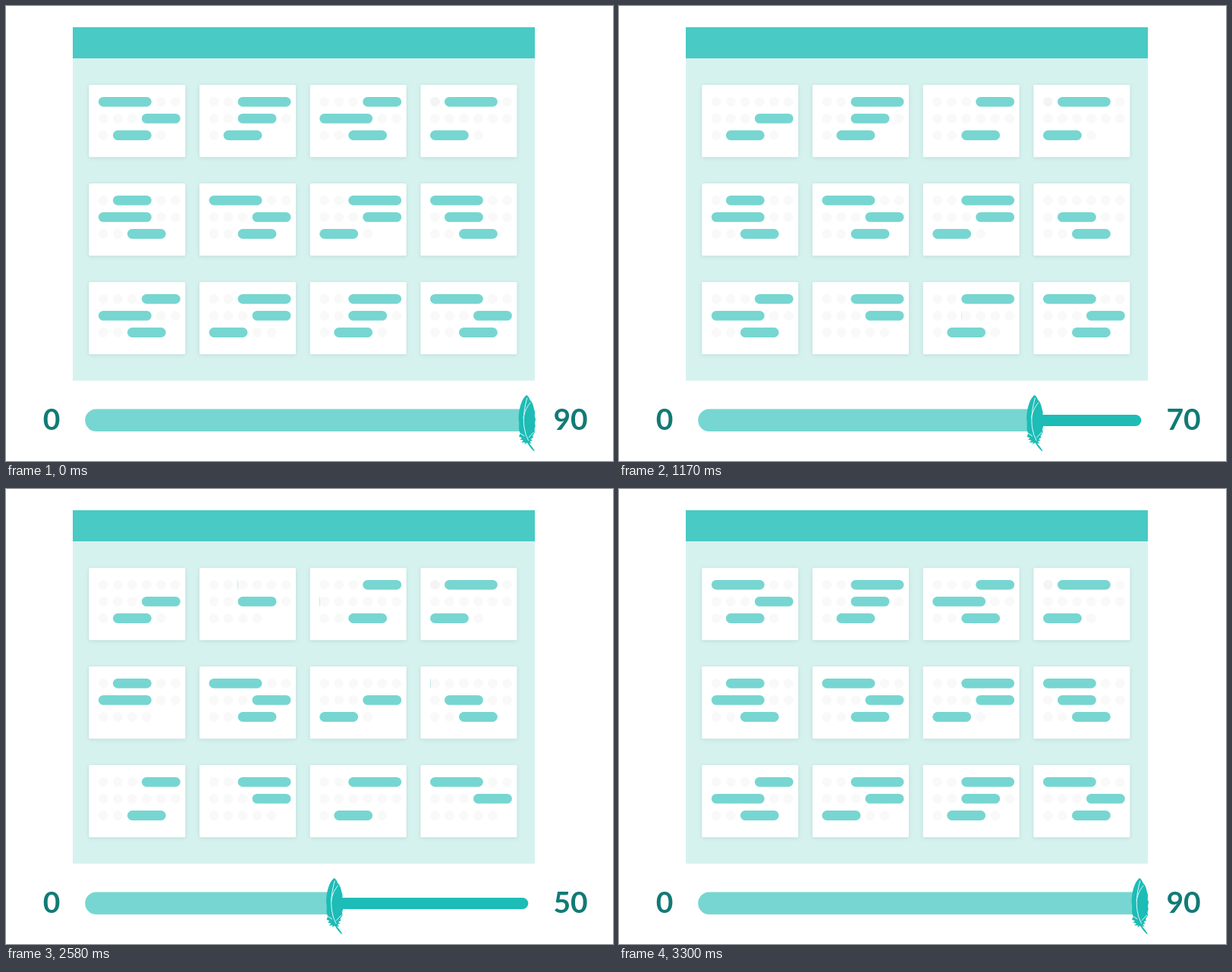
Recreate the animation shown at these times as an HTML page. Size 800 by 600 pixels, loop 3600 ms.

```html
<!DOCTYPE html>
<html lang="en">
<head>
<meta charset="utf-8">
<title>Slider filter</title>
<style>
  html, body { margin: 0; width: 100%; height: 100%; overflow: hidden; background: #fff; }
  svg { display: block; width: 800px; height: 600px; }
  text { font: 700 39px Lato, "Open Sans", sans-serif; fill: #127a75; text-anchor: middle; }
  .card { fill: #fff; filter: drop-shadow(0 1px 2.5px rgba(0, 80, 75, .14)); }
  .dot { fill: #f9f9f9; }
  .bar { fill: #77d6d1; }
  .slit { fill: none; stroke: #e4f7f6; stroke-width: 1; stroke-linecap: round; }
</style>
</head>
<body>
<svg viewBox="0 0 800 600">
  <rect x="88" y="28" width="609" height="466" fill="#d6f2ef"/>
  <rect x="88" y="28" width="609" height="41" fill="#49cac5"/>
  <g id="cards"></g>
  <rect x="300" y="539" width="388.3" height="15" rx="7.5" fill="#1dbcb6"/>
  <path id="fill" class="bar"/>
  <g id="feather">
    <path fill="#1dbcb6" d="M0 513C2 514 4 517 4.500 519.500C7 521 9 526 9.800 531L11 535L10.800 541L12 545L11 550L11.700 554L10.500 558L11 562L8 567L9 569L5.500 571L8 573L4.500 574L6.500 577L3.500 576.500C6 580 9 583 11 587L9 586.500C6 583 3 580 1 576L-3 578L-1.500 575.500L-7 575.500L-4 573L-8.500 571.500L-6 569.500L-10 568L-8.500 564L-10 558L-9.800 550L-10.500 544C-10 530 -6.500 518 0 513Z"/>
    <path class="slit" d="M.8 517C-2.500 528 -5 543 -3 556Q-1.500 566 2.500 573"/>
    <path class="slit" d="M5 523C1 528 -2.500 534 -4 543M-9 563L-3 567M9.500 562L3 569"/>
  </g>
  <text x="60" y="559">0</text>
  <text id="count" x="744" y="559">90</text>
</svg>
<script>
const LOOP = 3600, STEP = 30, PITCH = 19, R = 6.4;

// Bars per card row: first column and length, "--" for none
const CARDS = [
  "04 33 13", "24 23 13", "33 04 23", "14 -- 03",
  "13 04 23", "04 33 23", "24 33 03", "04 13 23",
  "33 04 23", "24 33 03", "24 23 13", "04 33 23"
];
const LAST_ROW = [5, 4, 5, 4, 4, 5, 4, 5, 5, 5, 5, 5];

// "card.row": [time it leaves, time it returns]
const MOVES = {
  "0.0": [450, 2575], "7.0": [450, 2550],
  "2.1": [600, 2550], "9.2": [600, 2700], "10.1": [750, 2700],
  "1.0": [1500, 2550], "1.2": [1500, 2700],
  "4.2": [1650, 2850], "6.0": [1650, 2700],
  "8.1": [1800, 2850], "11.2": [1800, 2850]
};

const clamp = v => Math.min(1, Math.max(0, v));

function bezier(x1, y1, x2, y2) {
  const at = (a, b, s) => 3 * (1 - s) ** 2 * s * a + 3 * (1 - s) * s * s * b + s ** 3;
  return x => {
    if (x <= 0) return 0;
    if (x >= 1) return 1;
    let lo = 0, hi = 1;
    for (let i = 0; i < 24; i++) {
      const mid = (lo + hi) / 2;
      if (at(x1, x2, mid) < x) lo = mid; else hi = mid;
    }
    return at(y1, y2, lo);
  };
}

const ease = bezier(.25, .1, .25, 1);
const easeInOut = bezier(.42, 0, .58, 1);
const glide = bezier(.52, 0, .1, 1);
const glideBack = bezier(.52, 0, .13, 1);
const tick = bezier(.52, 0, .2, 1);
const tickBack = bezier(.45, 0, .2, 1);

// start, duration, change, easing
const FEATHER = [[450, 600, -138.4, glide], [1500, 600, -116, glide], [2550, 600, 254.4, glideBack]];
const COUNT = [[450, 600, -20, tick], [1500, 600, -20, tick], [2550, 750, 40, tickBack]];
const track = (from, legs, t) =>
  legs.reduce((v, [start, length, change, curve]) => v + change * curve(clamp((t - start) / length)), from);

const el = id => document.getElementById(id);
function add(parent, tag, attrs) {
  const node = document.createElementNS("http://www.w3.org/2000/svg", tag);
  for (const key in attrs) node.setAttribute(key, attrs[key]);
  return parent.appendChild(node);
}

const moving = [];
CARDS.forEach((rows, c) => {
  const x = 109.3 + c % 4 * 145.7, y = 104 + Math.floor(c / 4) * 130;
  add(el("cards"), "rect", { class: "card", x, y, width: 127, height: 95.3, rx: 1.5 });
  rows.split(" ").forEach((code, r) => {
    const left = x + 19, mid = y + 22.3 + r * 22.1;
    const dots = r < 2 ? 6 : LAST_ROW[c];
    for (let i = 0; i < dots; i++) {
      const dot = add(el("cards"), "circle", { class: "dot", cx: left + i * PITCH, cy: mid, r: R });
      if (c === 3 && r + i === 0) dot.style.fill = "#f4f4f4";
    }
    if (code === "--") return;
    const [col, len] = [...code].map(Number);
    const bar = add(el("cards"), "rect", {
      class: "bar", y: -R, width: (len - 1) * PITCH + 2 * R, height: 2 * R, rx: R
    });
    const place = `translate(${left + col * PITCH - R} ${mid})`;
    bar.setAttribute("transform", place);
    const times = MOVES[c + "." + r];
    if (times) moving.push({ bar, place, times });
  });
});

// Swell for 150 ms, then collapse to the left edge; returning runs it backwards
function squash(age) {
  if (age <= 150) {
    const p = clamp(age / 150);
    return [1 + .1 * easeInOut(p), 1 + .3 * p ** 3];
  }
  const p = ease(clamp((age - 150) / 300));
  return [1.1 * (1 - p), 1.3 - .3 * p];
}

function draw(t) {
  for (const { bar, place, times: [out, back] } of moving) {
    const [sx, sy] = squash(t < back ? t - out : 450 - (t - back));
    bar.setAttribute("transform", `${place} scale(${sx} ${sy})`);
  }
  const x = track(686, FEATHER, t);
  el("feather").setAttribute("transform", `translate(${x} 0)`);
  el("fill").setAttribute("d", `M${x} 531.500H119a14.800 14.800 0 0 0 0 29.600H${x}Z`);
  el("count").textContent = Math.round(track(90, COUNT, t));
}

const begin = performance.now();
function frame() {
  const t = (performance.now() - begin) % LOOP;
  draw(Math.floor(t / STEP) * STEP);
  requestAnimationFrame(frame);
}
frame();
</script>
</body>
</html>
```
